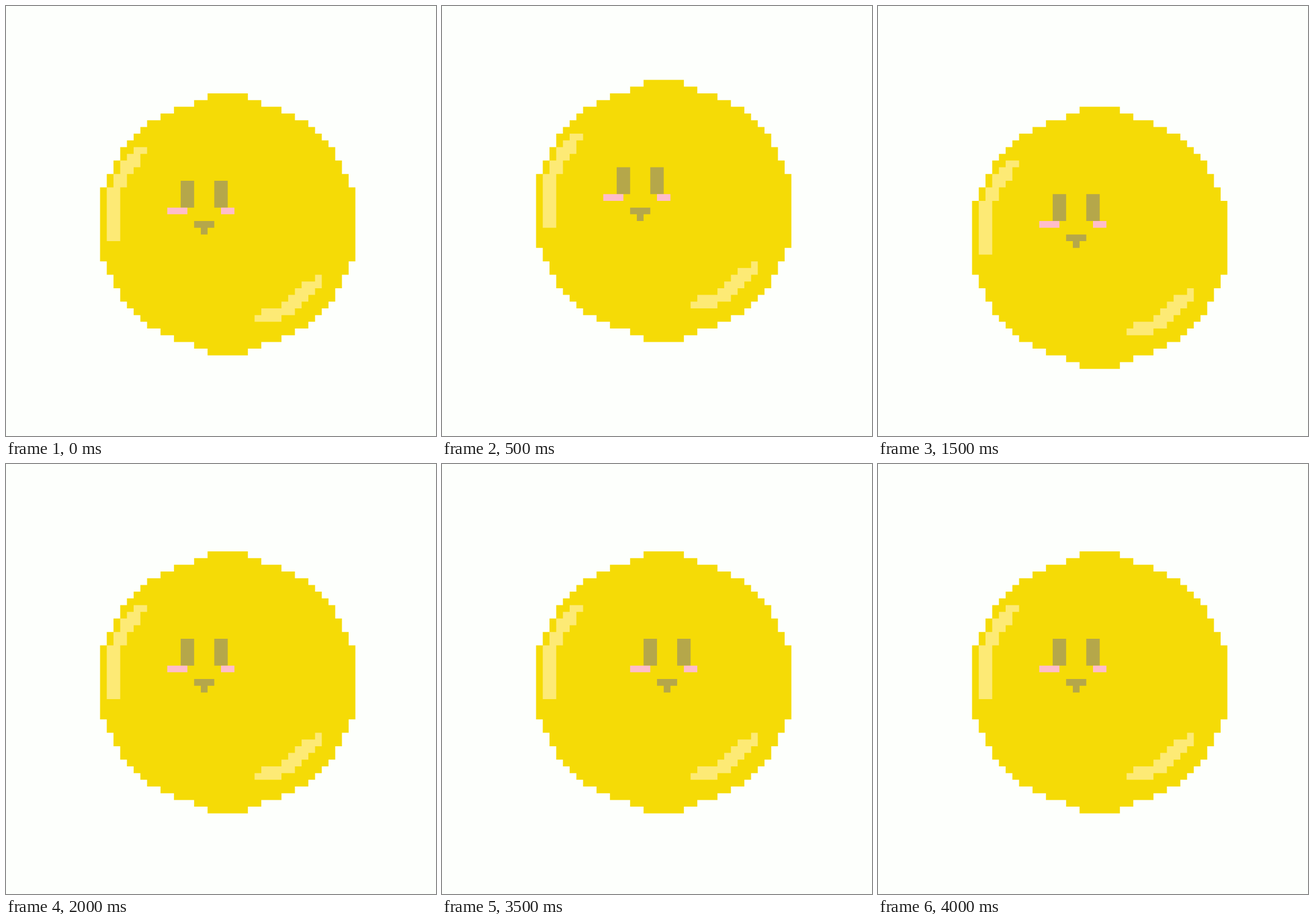
Animation of 748x748 px, one loop 4.5 s. Source, as an HTML page with a canvas:

```html
<!DOCTYPE html>
<html lang="en">
<head>
<meta charset="utf-8">
<title>Bouncing yellow ball</title>
<style>
html, body { margin: 0; width: 100%; height: 100%; overflow: hidden; background: #fdfffc; }
canvas { display: block; }
</style>
</head>
<body>
<canvas id="stage" width="748" height="748"></canvas>
<script>
const ctx = document.getElementById('stage').getContext('2d');
const CELL = 748 / 64;
const STEP = 500, STEPS = 9;
const YELLOW = '#f5db06', SHINE = '#fdea75', OLIVE = '#b5a74a', PINK = '#ffbdcb';

// Fills one path made of [left, top, right, bottom] boxes, in cells.
function fillBoxes(color, boxes) {
  ctx.fillStyle = color;
  ctx.beginPath();
  for (const [left, top, right, bottom] of boxes) {
    ctx.rect(left, top, right - left, bottom - top);
  }
  ctx.fill();
}

// One box per row; span(i) gives the row's [left, right].
const rows = (top, count, span) => Array.from({ length: count }, (_, i) => {
  const [left, right] = span(i);
  return [left, top + i, right, top + i + 1];
});

// The outline steepens in four slopes towards the ball's middle row.
function halfWidth(fromMiddle) {
  return Math.min(19, Math.floor((43 - fromMiddle) / 2), 27 - fromMiddle,
    Math.round(45.75 - 2.25 * fromMiddle));
}

const ball = rows(13, 39, i => {
  const half = halfWidth(Math.abs(i - 19));
  return [33 - half, 33 + half];
});

const upperShine = rows(21, 14, i => [
  Math.max(15, 19 - Math.ceil(i * 0.6)),
  Math.max(17, 21 - Math.round(i * 2 / 3))
]);

const lowerShine = [
  [46, 40, 47, 41],
  ...rows(41, 4, i => [44 - i, 47 - i]),
  [38, 45, 43, 46],
  [37, 46, 41, 47]
];

const eyes = [[26, 26, 28, 30], [31, 26, 33, 30]];
const cheeks = [[24, 30, 27, 31], [32, 30, 34, 31]];
const mouth = [[28, 32, 31, 33], [29, 33, 30, 34]];

function draw() {
  const step = Math.floor(performance.now() / STEP) % STEPS;
  const bounce = step < 4 ? -2 * Math.round(Math.sin(step * Math.PI / 2)) : 0;
  const look = Math.max(0, 8 - 4 * Math.abs(step - 6));

  ctx.setTransform(CELL, 0, 0, CELL, 0, 0);
  fillBoxes('#fdfffc', [[0, 0, 64, 64]]);
  ctx.translate(0, bounce);
  fillBoxes(YELLOW, ball);
  fillBoxes(SHINE, [...upperShine, ...lowerShine]);
  ctx.translate(look, 0);
  fillBoxes(OLIVE, [...eyes, ...mouth]);
  fillBoxes(PINK, cheeks);
  requestAnimationFrame(draw);
}
draw();
</script>
</body>
</html>
```
